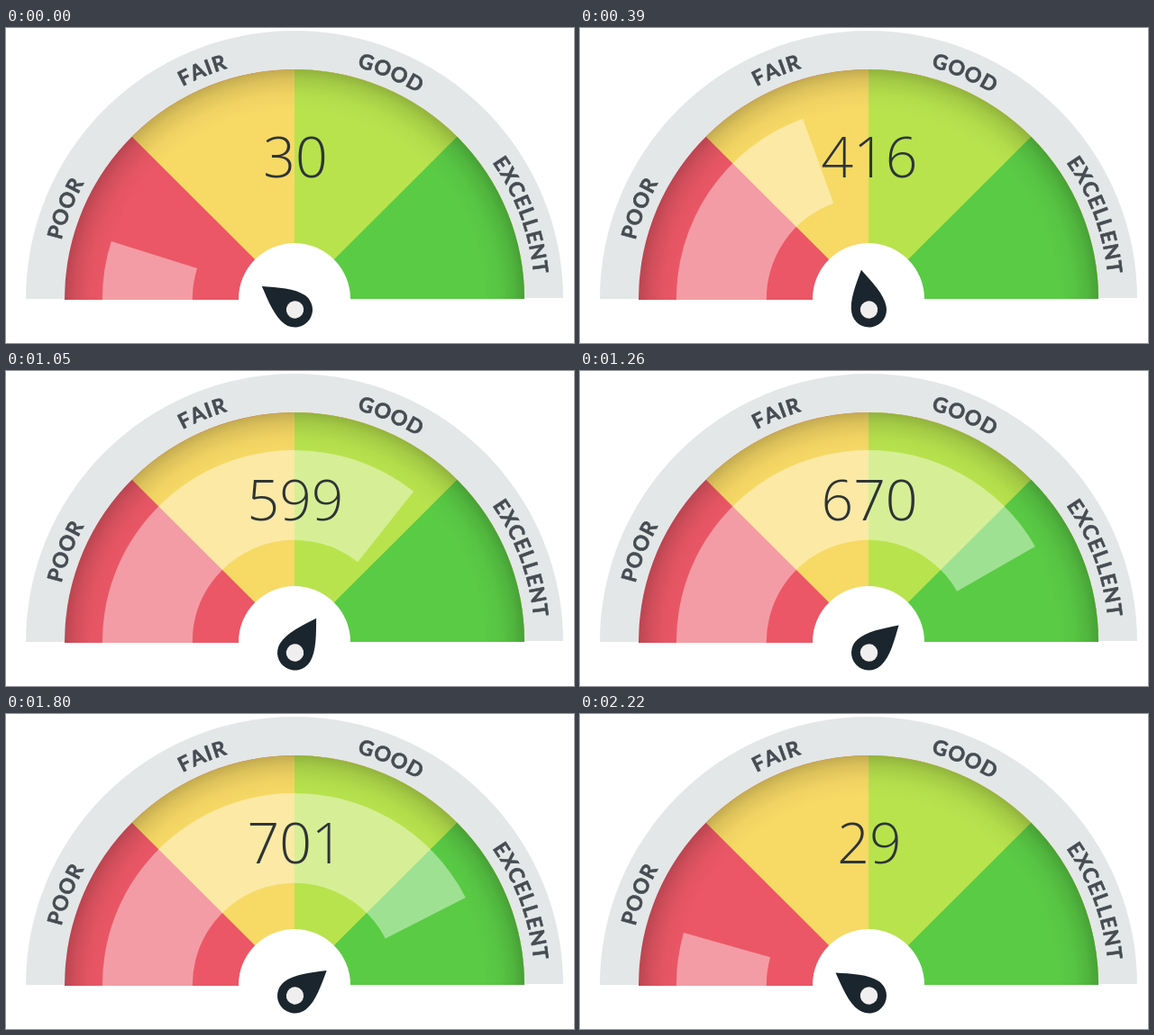
Recreate the animation shown at these times as an HTML page with a canvas. Size 630 by 350 pixels, loop 2250 ms.

```html
<!DOCTYPE html>
<html lang="en">
<head>
<meta charset="utf-8">
<title>Score gauge</title>
<style>
  html, body { margin: 0; width: 630px; height: 350px; overflow: hidden; background: #fff; }
  canvas { display: block; }
</style>
</head>
<body>
<canvas id="stage" width="630" height="350"></canvas>
<script>
const ctx = document.getElementById('stage').getContext('2d');
const PERIOD = 2250, STEP = 30;
const CX = 320, CY = 301;
const RING = 298, DIAL = 255, HUB = 62, BAND_OUT = 213.1, BAND_IN = 113.2;
const SECTORS = ['#eb5766', '#f7d965', '#b8e34d', '#5acb45'];
const LABELS = [['POOR', 21.5], ['FAIR', 68], ['GOOD', 113], ['EXCELLENT', 159.7]];

// time, band angle, needle angle, score; degrees run clockwise from the left
const KEYS = [
  [0, 17.5, 35.4, 30],
  [390, 70, 79, 416],
  [540, 78, 85, 441],
  [780, 100.6, 100.7, 509],
  [1050, 128.3, 121.7, 599],
  [1470, 162.5, 146, 710],
  [1620, 162.5, 146, 710],
  [1810, 152, 141, 700],
  [1980, 102, 110, 597],
  [2160, 24, 43, 150],
  [2220, 15.8, 34.7, 29]
];

const rad = deg => Math.PI + deg * Math.PI / 180;

function keyAt(i, track) {
  const n = KEYS.length, key = KEYS[(i + n) % n];
  return { t: key[0] + Math.floor(i / n) * PERIOD, v: key[track] };
}

function slope(i, track) {
  const a = keyAt(i - 1, track), b = keyAt(i, track), c = keyAt(i + 1, track);
  const before = (b.v - a.v) / (b.t - a.t), after = (c.v - b.v) / (c.t - b.t);
  return before * after > 0 ? 2 * before * after / (before + after) : 0;
}

// Monotone cubic interpolation around the loop
function sample(t, track) {
  let i = KEYS.length - 1;
  while (KEYS[i][0] > t) i--;
  const a = keyAt(i, track), b = keyAt(i + 1, track);
  const h = b.t - a.t, u = (t - a.t) / h, w = 1 - u;
  return a.v * (1 + 2 * u) * w * w + b.v * (3 - 2 * u) * u * u
    + h * u * w * (slope(i, track) * w - slope(i + 1, track) * u);
}

function disc(x, y, r, fill) {
  ctx.fillStyle = fill;
  ctx.beginPath();
  ctx.arc(x, y, r, 0, 2 * Math.PI);
  ctx.fill();
}

// Cuts off the drawing below a given line in each half
function clipped(leftBottom, rightBottom, paint) {
  ctx.save();
  ctx.beginPath();
  ctx.rect(0, 0, CX, leftBottom);
  ctx.rect(CX, 0, 310, rightBottom);
  ctx.clip();
  paint();
  ctx.restore();
}

function drawDial() {
  // Each sector runs on under the next, so no seam shows between them
  SECTORS.forEach((color, i) => {
    ctx.fillStyle = color;
    ctx.beginPath();
    ctx.moveTo(CX, CY);
    ctx.arc(CX, CY, DIAL, rad(i ? i * 45 : -2), rad(182));
    ctx.fill();
  });
  const shade = ctx.createRadialGradient(CX, CY, 210, CX, CY, DIAL);
  shade.addColorStop(0, 'rgba(0,0,0,0)');
  shade.addColorStop(0.4, 'rgba(0,0,0,0.03)');
  shade.addColorStop(0.75, 'rgba(0,0,0,0.11)');
  shade.addColorStop(1, 'rgba(0,0,0,0.21)');
  disc(CX, CY, DIAL, shade);
}

function drawBand(angle) {
  ctx.fillStyle = 'rgba(255,255,255,0.41)';
  ctx.beginPath();
  ctx.arc(CX, CY, BAND_OUT, rad(-2), rad(angle));
  ctx.arc(CX, CY, BAND_IN, rad(angle), rad(-2), true);
  ctx.fill();
}

function drawLabel(text, middle) {
  const radius = 275, gap = 1.5;
  ctx.font = '700 23px Lato, sans-serif';
  ctx.fillStyle = ctx.strokeStyle = '#474c52';
  ctx.lineWidth = 0.6;
  const widths = [...text].map(ch => ctx.measureText(ch).width + gap);
  let x = -widths.reduce((sum, w) => sum + w, 0) / 2;
  [...text].forEach((ch, i) => {
    const along = x + widths[i] / 2;
    ctx.save();
    ctx.translate(CX, CY);
    ctx.rotate((middle - 90) * Math.PI / 180 + along / radius);
    ctx.fillText(ch, 0, 8.3 - radius);
    ctx.strokeText(ch, 0, 8.3 - radius);
    ctx.restore();
    x += widths[i];
  });
}

function drawNeedle(angle) {
  const r = 19.5, tip = -45;
  ctx.save();
  ctx.translate(320.5, 313);
  ctx.rotate((angle - 90) * Math.PI / 180);
  ctx.fillStyle = '#1b252d';
  ctx.beginPath();
  ctx.moveTo(0, tip);
  ctx.bezierCurveTo(9, -30, r, -14, r, 0);
  ctx.arc(0, 0, r, 0, Math.PI);
  ctx.bezierCurveTo(-r, -14, -9, -30, 0, tip);
  ctx.fill();
  disc(0, 0, 9.7, '#f0eeee');
  ctx.restore();
}

function draw(t) {
  ctx.fillStyle = '#fff';
  ctx.fillRect(0, 0, 630, 350);
  ctx.textAlign = 'center';
  ctx.textBaseline = 'alphabetic';

  clipped(301, 300, () => disc(CX, CY, RING, '#e3e7e8'));
  clipped(302, 301, () => {
    drawDial();
    drawBand(sample(t, 1));
  });

  disc(CX, CY, HUB, '#fff');
  LABELS.forEach(([text, middle]) => drawLabel(text, middle));
  drawNeedle(sample(t, 2));

  ctx.font = '300 62.5px "Open Sans", sans-serif';
  ctx.fillStyle = '#2d3436';
  ctx.fillText(Math.round(sample(t, 3)), 321, 165.5);
}

function tick() {
  const t = performance.now() % PERIOD;
  draw(Math.floor(t / STEP) * STEP);
  requestAnimationFrame(tick);
}
tick();
</script>
</body>
</html>
```
